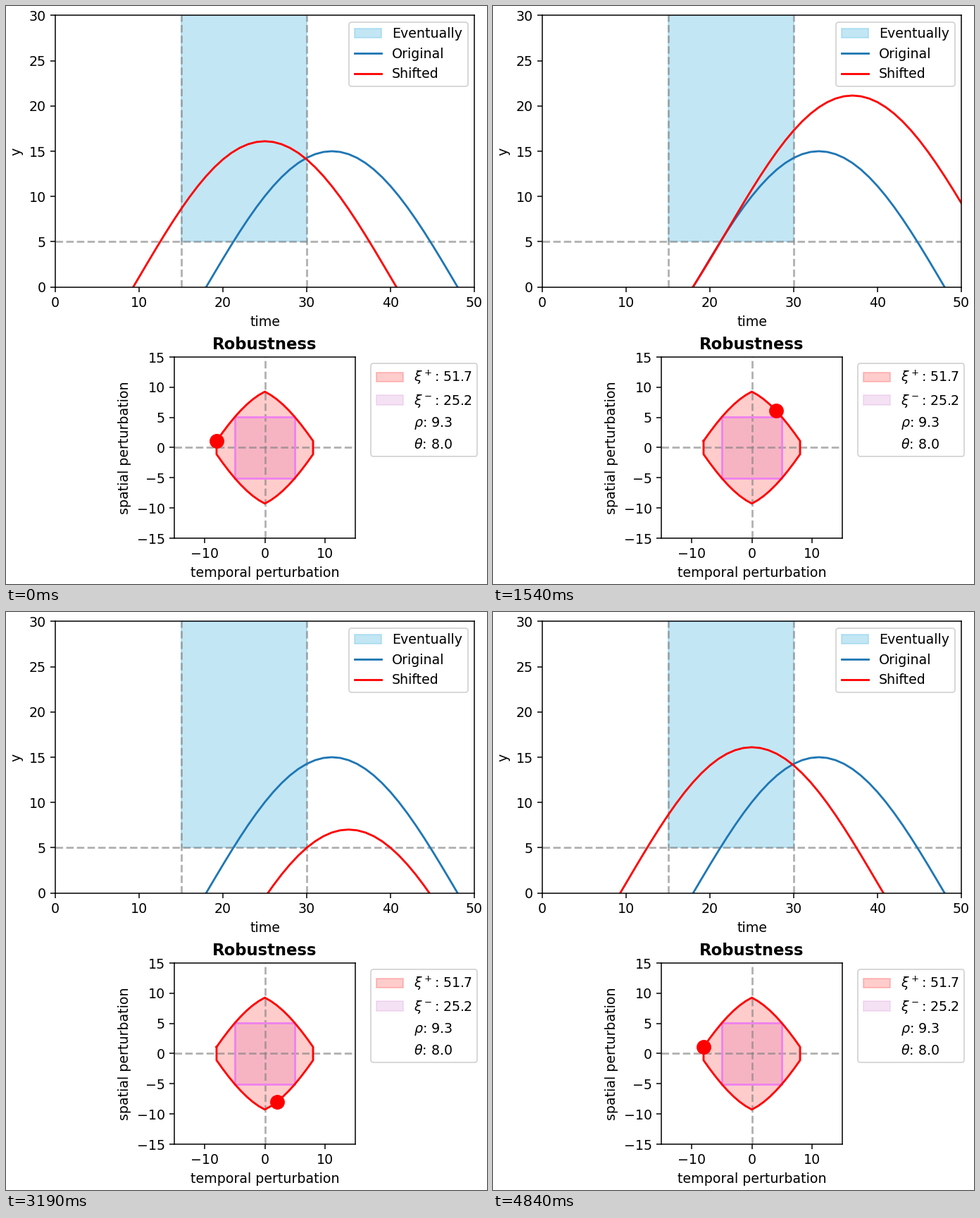
Recreate the animation shown at these times as a matplotlib script. Size 683 by 820 pixels, loop 5.06 s.

```python
import numpy as np
import matplotlib.pyplot as plt
from matplotlib.animation import FuncAnimation
from matplotlib.lines import Line2D
from matplotlib.patches import Patch, Rectangle

W, H, DPI = 683, 820, 136.6
LEVEL, START, END = 5, 15, 30
MAX_SHIFT = 8
DASHED = dict(color="gray", alpha=0.6, linestyle="--", linewidth=1.5)


def signal(t):
    return 15 * np.sin(np.pi * (t - 18) / 30)


def margin(shift):
    """Largest vertical shift that keeps the property's truth value."""
    return signal(END - np.abs(shift)) - LEVEL


def boundary():
    """Clockwise walk along the robust region, pausing at each corner."""
    rise = np.arange(-MAX_SHIFT, 1)
    fall = np.arange(0, MAX_SHIFT + 1)
    corner = margin(MAX_SHIFT)
    side = np.linspace(corner, -corner, 4)
    edge = np.full(4, MAX_SHIFT)
    shift = np.concatenate([rise[:1], rise, fall, edge, fall[::-1],
                            rise[::-1], -edge, rise[:1]])
    top = [corner], margin(rise), margin(fall), side
    bottom = -margin(fall[::-1]), -margin(rise[::-1]), -side, [corner]
    return shift, np.concatenate(top + bottom)


def add_axes(left, top, right, bottom, **settings):
    box = [left / W, 1 - bottom / H, (right - left) / W, (bottom - top) / H]
    return fig.add_axes(box, **settings)


fig = plt.figure(figsize=((W + 0.01) / DPI, (H + 0.01) / DPI), dpi=DPI,
                 facecolor="white")
shifts, offsets = boundary()
time = np.arange(-5, 66)

# Signal plot
ax = add_axes(70, 13.3, 665, 398.7, xlim=(0, 50), ylim=(0, 30),
              xlabel="time", ylabel="y", yticks=range(0, 31, 5))
ax.add_patch(Rectangle((START, LEVEL), END - START, 30 - LEVEL,
                       color="skyblue", alpha=0.5, label="Eventually"))
ax.axhline(LEVEL, **DASHED)
ax.axvline(START, **DASHED)
ax.axvline(END, **DASHED)
ax.plot(time, signal(time), color="tab:blue", label="Original")
shifted, = ax.plot([], [], color="red", label="Shifted")
ax.legend(loc="upper right")

# Robustness plot
rob = add_axes(239, 498, 496, 755, xlim=(-15, 15), ylim=(-15, 15),
               xticks=(-10, 0, 10), yticks=range(-15, 16, 5),
               xlabel="temporal perturbation", ylabel="spatial perturbation")
rob.set_title("Robustness", fontweight="bold")
rob.axhline(0, **DASHED)
rob.axvline(0, **DASHED)
half = 5
height = margin(half)
box_x = half * np.array([-1, 1, 1, -1, -1])
box_y = height * np.array([-1, -1, 1, 1, -1])
rob.fill(box_x, box_y, color="plum", alpha=0.3, linewidth=0)
rob.fill(shifts, offsets, color="red", alpha=0.2, linewidth=0)
rob.plot(box_x, box_y, color="violet")
rob.plot(shifts, offsets, color="red")
marker, = rob.plot([], [], "o", color="red", markersize=10)

blank = Line2D([], [], linestyle="none")
rob.legend(
    [Patch(color="red", alpha=0.2), Patch(color="plum", alpha=0.3), blank, blank],
    [r"$\xi^+$: 51.7", r"$\xi^-$: 25.2", r"$\rho$: 9.3", r"$\theta$: 8.0"],
    loc="upper left", bbox_to_anchor=(1.05, 1))


def update(i):
    shifted.set_data(time + shifts[i], signal(time) + offsets[i])
    marker.set_data([shifts[i]], [offsets[i]])
    return shifted, marker


anim = FuncAnimation(fig, update, frames=len(shifts), interval=110,
                     repeat=True, repeat_delay=0)
plt.show()
```
